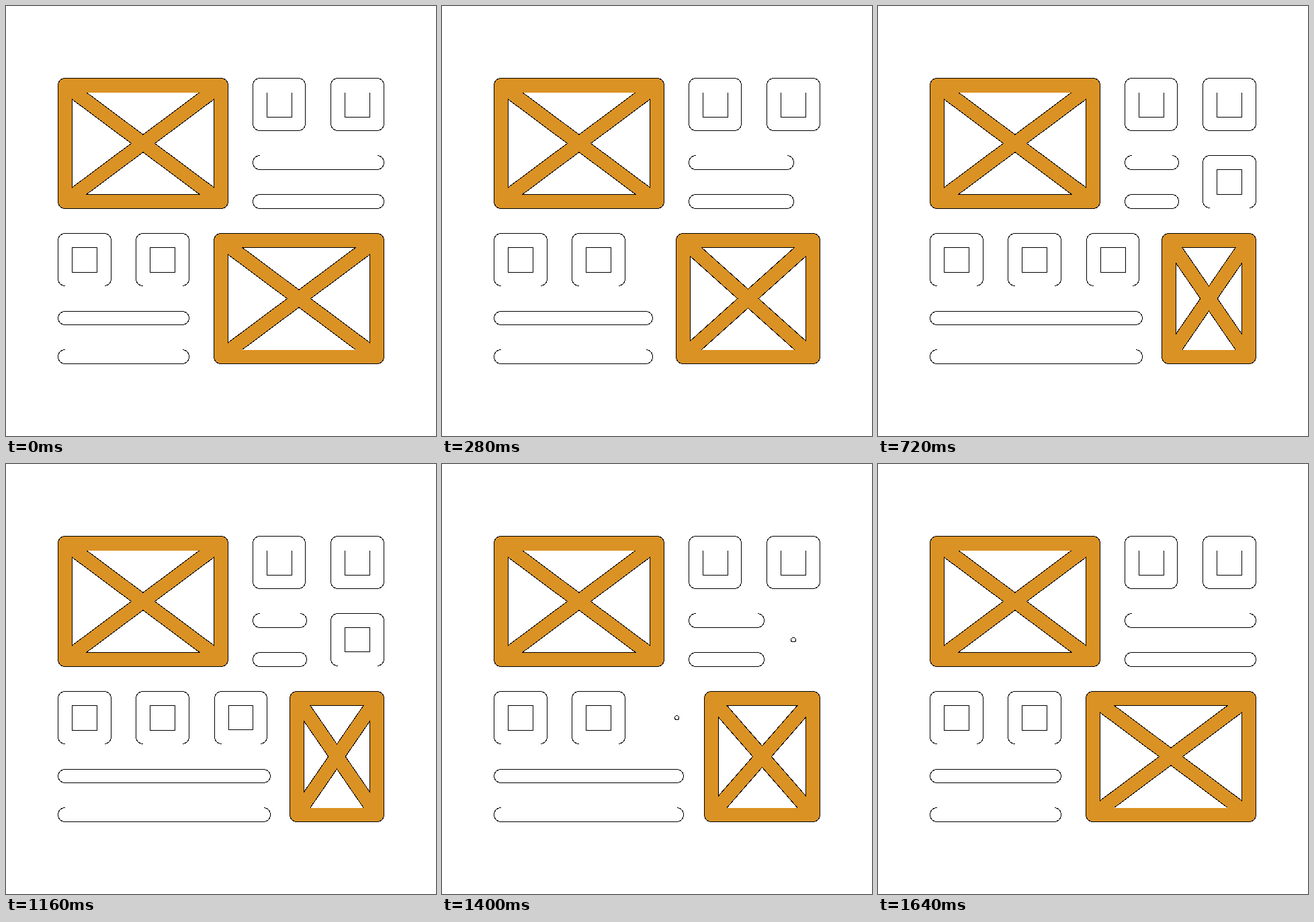
These frames come from a looping animation (640x640 px, 2.12 s). An HTML page:

```html
<!DOCTYPE html>
<html>
<head>
<meta charset="utf-8">
<style>
  html, body { margin: 0; width: 100%; height: 100%; overflow: hidden; background: #fff; }
  svg { display: block; width: 100vw; height: 100vh; }
</style>
</head>
<body>
<svg viewBox="0 0 640 640" shape-rendering="crispEdges">
  <path id="fill" fill="#da9224" fill-rule="evenodd"/>
  <path id="lines" fill="none" stroke="#000"/>
</svg>
<script>
const LOOP = 2120, STEP = 40;
const RADIUS = 10, BORDER = 21, SQUARE = 78.5;
const fillPath = document.getElementById('fill');
const linePath = document.getElementById('lines');

const snap = v => Math.floor(v) + 0.5;

function ease(time, start, duration) {
  const t = Math.min(1, Math.max(0, (time - start) / duration));
  return t < 0.5 ? 4 * t ** 3 : 1 - 4 * (1 - t) ** 3;
}

// Rounded outline; `open` names a straight edge that is left undrawn.
function outline(x0, y0, x1, y1, open = '') {
  [x0, y0, x1, y1] = [x0, y0, x1, y1].map(snap);
  const r = Math.min(RADIUS, (x1 - x0) / 2, (y1 - y0) / 2);
  const arc = (x, y) => `A${r} ${r} 0 0 1 ${x} ${y}`;
  const edge = name => open === name ? 'M' : 'L';
  return `M${x0} ${y0 + r}${arc(x0 + r, y0)}${edge('top')}${x1 - r} ${y0}` +
    `${arc(x1, y0 + r)}L${x1} ${y1 - r}${arc(x1 - r, y1)}` +
    `${edge('bottom')}${x0 + r} ${y1}${arc(x0, y1 - r)}L${x0} ${y0 + r}`;
}

// Triangle from one base end over the apex to the other base end.
const triangle = (a, apex, b, closed) => `M${a}L${apex}L${b}${closed ? 'Z' : ''}`;

// Frame with crossed diagonals, as separate fill and line paths.
function crossedBox(x0, y0, x1, y1, open) {
  x0 = snap(x0);
  const half = BORDER / 2, cx = (x0 + x1) / 2, cy = (y0 + y1) / 2;
  const dx = x1 - x0 - BORDER, dy = y1 - y0 - BORDER, length = Math.hypot(dx, dy);
  const v = half * length / dx, h = half * length / dy;
  const left = x0 + BORDER, right = x1 - BORDER, top = y0 + BORDER, bottom = y1 - BORDER;
  const insetX = half + half * dx / dy + h, insetY = half + half * dy / dx + v;
  const holes = all =>
    triangle([left, y0 + insetY], [cx - h, cy], [left, y1 - insetY], true) +
    triangle([right, y0 + insetY], [cx + h, cy], [right, y1 - insetY], true) +
    triangle([x0 + insetX, top], [cx, cy - v], [x1 - insetX, top], all || open !== 'top') +
    triangle([x0 + insetX, bottom], [cx, cy + v], [x1 - insetX, bottom], all || open !== 'bottom');
  const frame = outline(x0, y0, x1, y1);
  return { fill: frame + 'Z' + holes(true), lines: frame + holes(false) };
}

function square(cx, cy, scale, outerOpen, innerOpen) {
  const size = SQUARE * scale, half = size / 2, inner = (size - 41.5) / 2;
  if (size < 1) return '';
  let path = outline(cx - half, cy - half, cx + half, cy + half, outerOpen);
  if (inner > 0) {
    const [l, t, r, b] = [cx - inner, cy - inner, cx + inner, cy + inner].map(snap);
    path += `M${l} ${t}V${b}H${r}V${t}${innerOpen ? '' : 'Z'}`;
  }
  return path;
}

function draw(time) {
  const slide = ease(time, 89, 433) - ease(time, 1241, 385);
  const grow = ease(time, 249, 433) - ease(time, 1121, 385);
  const barRight = 562.5 - 115 * slide, barLeft = 272.5 + 120.5 * slide;
  const boxes = [
    crossedBox(77.5, 107.5, 330.5, 301.5, 'top'),
    crossedBox(309.5 + 113 * slide, 338.5, 562.5, 532.5, 'bottom')
  ];
  fillPath.setAttribute('d', boxes.map(b => b.fill).join(''));
  linePath.setAttribute('d', [
    ...boxes.map(b => b.lines),
    square(406.5, 146.5, 1, '', true),
    square(523, 146.5, 1, '', true),
    square(116.8, 377.6, 1, 'bottom'),
    square(233, 377.6, 1, 'bottom'),
    square(523, 261.6, grow, grow > 0.9 ? 'bottom' : ''),
    square(349.6, 377.6, grow, grow > 0.9 ? 'bottom' : ''),
    outline(367.5, 222.5, barRight, 243.5, 'top'),
    outline(367.5, 280.5, barRight, 301.5),
    outline(77.5, 454.5, barLeft, 474.5),
    outline(77.5, 511.5, barLeft, 532.5, 'top')
  ].join(''));
}

const begin = performance.now();
function tick() {
  const time = (performance.now() - begin) % LOOP;
  draw(Math.floor(time / STEP) * STEP);
  requestAnimationFrame(tick);
}
tick();
</script>
</body>
</html>
```
